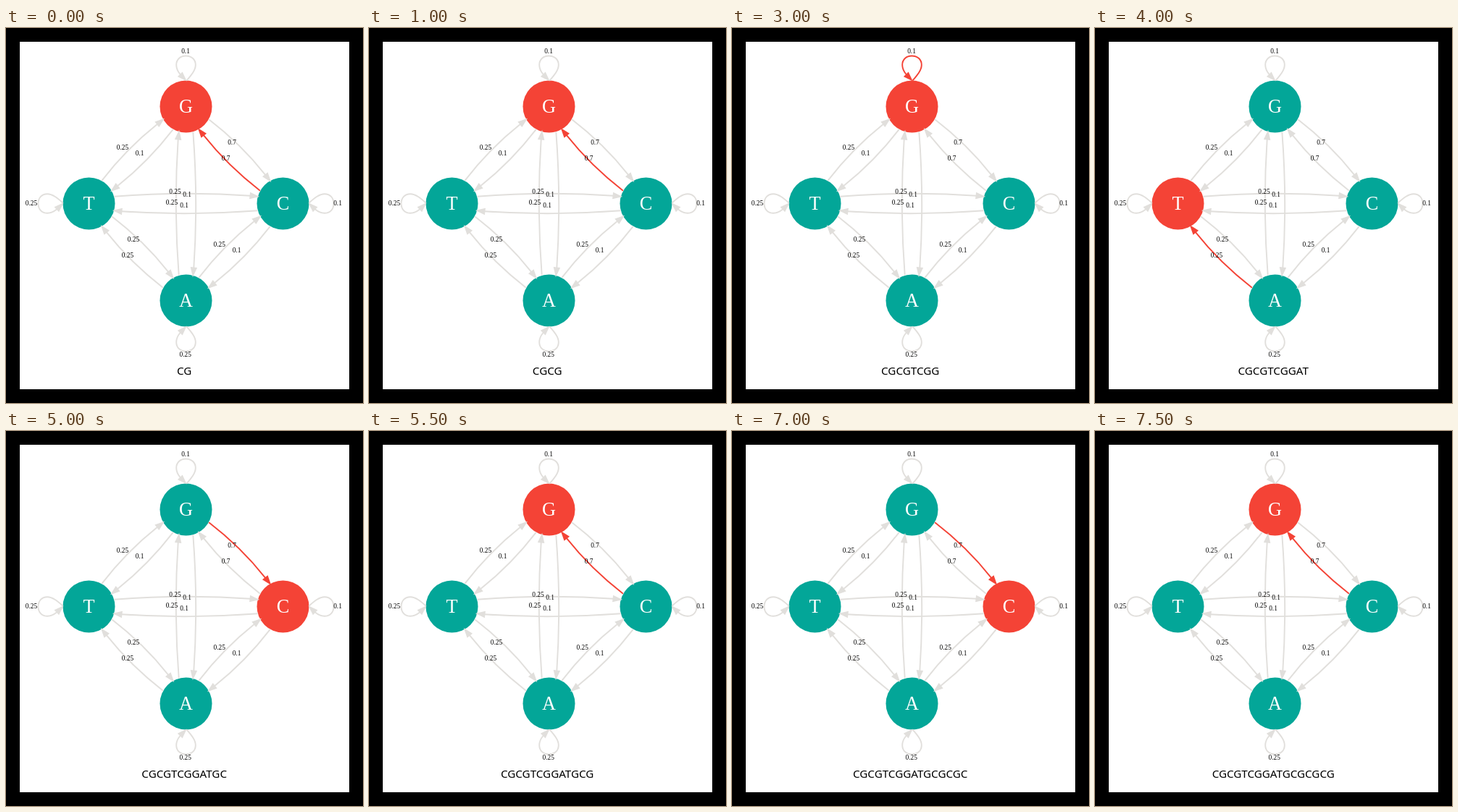
Write an HTML page that moves like this. It is 493 px wide and 518 px high and loops after 8000 ms.

```html
<!DOCTYPE html>
<html lang="en">
<head>
<meta charset="utf-8">
<title>Markov chain walk</title>
<style>
  html, body { margin: 0; width: 100%; height: 100%; overflow: hidden; background: #000; }
  svg { display: block; }
  .node { fill: #03a698; }
  .node.on { fill: #f44336; }
  .edge { stroke: #e1dfdc; fill: #e1dfdc; stroke-width: 1.9; }
  .edge.on { stroke: #f44336; fill: #f44336; }
  .edge .line { fill: none; }
  text { text-anchor: middle; }
  .letter { font: 26.3px "Liberation Serif", serif; fill: #fff; }
  .weight { font: 9.4px "Liberation Serif", serif; fill: #000; }
  #word { font: 15.2px "Noto Sans", "Open Sans", sans-serif; fill: #000; }
</style>
</head>
<body>
<svg id="stage" width="493" height="518" viewBox="0 0 493 518">
  <rect width="493" height="518"/>
  <rect x="19" y="19" width="455" height="480" fill="#fff"/>
  <g id="nodes"></g>
  <g id="edges"></g>
  <g id="labels"></g>
  <text id="word" x="246.2" y="479"></text>
</svg>
<script>
const SEQUENCE = 'CGCGTCGGATGCGCGCG';
const STEP = 500, LOOP = 8000, RADIUS = 36;

// Centre of each state, outward direction of its loop, side the loop returns on
const states = {
  G: { c: [248.5, 108.5], out: [0, -1], side: [-1, 0] },
  T: { c: [114.5, 242.5], out: [-1, 0], side: [0, 1] },
  C: { c: [382.5, 242.5], out: [1, 0], side: [0, 1] },
  A: { c: [248.5, 376.5], out: [0, 1], side: [-1, 0] }
};

// Edge, weight, label centre
const links = [
  ['GG', 0.1, 248, 32], ['TT', 0.25, 35, 242], ['CC', 0.1, 458, 242], ['AA', 0.25, 247.7, 451],
  ['TG', 0.25, 161, 165], ['GT', 0.1, 184.5, 173], ['GC', 0.7, 312, 158], ['CG', 0.7, 303.7, 180],
  ['TA', 0.25, 176, 292], ['AT', 0.25, 168, 314], ['AC', 0.25, 294.7, 299], ['CA', 0.1, 318.5, 307],
  ['GA', 0.1, 250, 230], ['AG', 0.25, 229, 241], ['TC', 0.25, 233.5, 226], ['CT', 0.1, 246, 245]
];

const $ = id => document.getElementById(id);

function add(parent, tag, attrs, text) {
  const el = document.createElementNS('http://www.w3.org/2000/svg', tag);
  for (const key in attrs) el.setAttribute(key, attrs[key]);
  if (text !== undefined) el.textContent = text;
  return parent.appendChild(el);
}

// Maps (along, across) coordinates to the stage
const frame = (o, u, n) => (a, b) => [o[0] + u[0] * a + n[0] * b, o[1] + u[1] * a + n[1] * b];

function arrow(base, tip) {
  const dx = tip[0] - base[0], dy = tip[1] - base[1];
  const wing = k => [base[0] - dy * k, base[1] + dx * k];
  return `M${wing(0.35)}L${tip}L${wing(-0.35)}Z`;
}

function loopShape({ c, out, side }) {
  const p = frame(c, out, side);
  return {
    line: `M${p(36, -1)}C${p(43, -7)} ${p(50, -13.3)} ${p(57.5, -13.3)}` +
      `C${p(65, -13.3)} ${p(70, -8)} ${p(70, 0)}C${p(70, 8)} ${p(65, 13.3)} ${p(57.5, 13.3)}` +
      `C${p(53, 13.3)} ${p(48.5, 11.3)} ${p(44.5, 8)}`,
    head: arrow(p(44, 7.6), p(37, 0.8))
  };
}

function bendShape(from, to) {
  const dx = to.c[0] - from.c[0], dy = to.c[1] - from.c[1];
  const len = Math.hypot(dx, dy), u = [dx / len, dy / len];
  const p = frame(from.c, u, [u[1], -u[0]]);
  const start = 35, end = len - 45, third = (end - start) / 3;
  return {
    line: `M${p(start, 9.8)}C${p(start + third, 14.6)} ${p(end - third, 15)} ${p(end, 10.8)}`,
    head: arrow(p(end, 10.8), p(end + 9.8, 9.7))
  };
}

const nodes = {}, edges = {};

for (const name in states) {
  const [cx, cy] = states[name].c;
  nodes[name] = add($('nodes'), 'circle', { class: 'node', cx, cy, r: RADIUS });
  add($('nodes'), 'text', { class: 'letter', x: cx, y: cy + 8.2 }, name);
}

for (const [key, weight, x, y] of links) {
  const [a, b] = key;
  const shape = a === b ? loopShape(states[a]) : bendShape(states[a], states[b]);
  const g = edges[key] = add($('edges'), 'g', { class: 'edge' });
  add(g, 'path', { class: 'line', d: shape.line });
  add(g, 'path', { d: shape.head });
  add($('labels'), 'text', { class: 'weight', x, y: y + 3.2 }, weight);
}

let shown = -1;

function draw() {
  const step = Math.floor(performance.now() % LOOP / STEP);
  if (step !== shown) {
    shown = step;
    const word = SEQUENCE.slice(0, step + 2);
    const move = word.slice(-2);
    for (const name in nodes) nodes[name].classList.toggle('on', name === move[1]);
    for (const key in edges) edges[key].classList.toggle('on', key === move);
    $('word').textContent = word;
  }
  requestAnimationFrame(draw);
}
draw();
</script>
</body>
</html>
```
